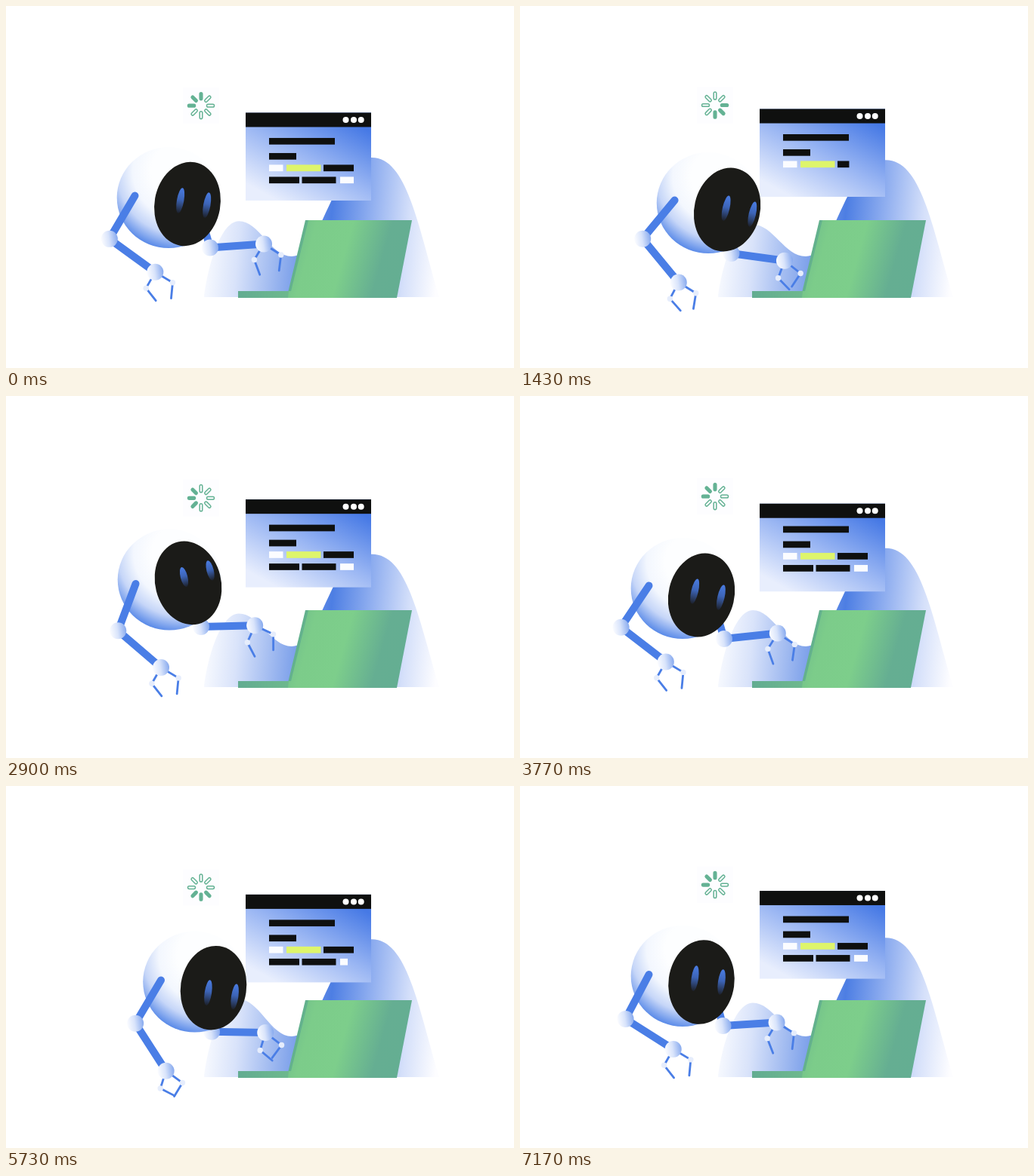
Recreate the animation shown at these times as an HTML page with a canvas. Size 672 by 480 pixels, loop 7.21 s.

```html
<!DOCTYPE html>
<html>
<head>
<meta charset="utf-8">
<style>
html, body { margin: 0; width: 672px; height: 480px; overflow: hidden; background: #fff; }
canvas { display: block; }
</style>
</head>
<body>
<canvas id="stage" width="672" height="480"></canvas>
<script>
const c = document.getElementById('stage').getContext('2d');
const LOOP = 7210, CYCLE = 3670, BOB = CYCLE / 2;
const BLUE = '#4a7ee6', GREEN = '#64b294', INK = '#0f100f';
const rad = d => d * Math.PI / 180;
const wave = (t, mid, amp, peak) => mid + amp * Math.cos((t - peak) / BOB * 2 * Math.PI);

// time, face x, y, tilt, gaze x, y, left upper arm, left forearm,
// right elbow x, right forearm, left grip, right grip
const POSES = [
  [0, 240, 262.5, 10, 8.2, -1.5, 120.4, 36, 30, -4, 0, 0],
  [100, 240, 264, 13, 8.5, -1, 123.7, 37.6, 30, -6, 0, 0],
  [360, 251, 267.5, 13, 9, 2, 129, 49, 20, 2, .5, .5],
  [670, 266, 270, 13, 10.5, 6, 134.1, 44.7, 9.5, 9, 1, 1],
  [1360, 274, 270, 13, 16, 2, 130.2, 49.9, 6, 8.2, .12, .85],
  [2100, 274.5, 267.5, 8, 10.5, 9, 119.9, 57.8, -2.5, .8, 1, 1],
  [2350, 263, 262, 0, 11, 2, 114, 63, 0, 0, .3, .3],
  [2760, 241.5, 247, -16, 12, -13, 110, 43.9, 13.5, -.8, 0, 0],
  [3500, 240, 260, 8, 9, -2.5, 117.7, 32.4, 28.5, -3.6, 0, 0]
];

// Smooth periodic interpolation without overshoot
function poseAt(t) {
  const n = POSES.length;
  const time = i => POSES[(i + n) % n][0] + Math.floor(i / n) * CYCLE;
  const val = (i, k) => POSES[(i + n) % n][k];
  const slope = (i, k) => (val(i + 1, k) - val(i, k)) / (time(i + 1) - time(i));
  const tangent = (i, k) => {
    const a = slope(i - 1, k), b = slope(i, k);
    return a * b > 0 ? 2 * a * b / (a + b) : 0;
  };
  let i = n - 1;
  while (time(i) > t) i--;
  const span = time(i + 1) - time(i), u = (t - time(i)) / span, v = 1 - u;
  return POSES[0].map((_, k) =>
    v * v * (1 + 2 * u) * val(i, k) + u * u * (3 - 2 * u) * val(i + 1, k) +
    span * u * v * (v * tangent(i, k) - u * tangent(i + 1, k)));
}

function stops(g, list) {
  list.forEach(([at, color]) => g.addColorStop(at, color));
  return g;
}
const linear = (x0, y0, x1, y1, ...list) => stops(c.createLinearGradient(x0, y0, x1, y1), list);

function rect(x, y, w, h, fill) {
  c.fillStyle = fill;
  c.fillRect(x, y, w, h);
}
function oval(x, y, rx, ry, tilt, fill) {
  c.beginPath();
  c.ellipse(x, y, rx, ry, tilt, 0, 2 * Math.PI);
  c.fillStyle = fill;
  c.fill();
}
function poly(points, fill) {
  c.beginPath();
  points.forEach(p => c.lineTo(...p));
  c.fillStyle = fill;
  c.fill();
}
function limb(points, width) {
  c.beginPath();
  points.forEach(p => c.lineTo(...p));
  c.lineWidth = width;
  c.lineCap = c.lineJoin = 'round';
  c.strokeStyle = BLUE;
  c.stroke();
}
const reach = ([x, y], length, deg) => [x + length * Math.cos(rad(deg)), y + length * Math.sin(rad(deg))];
const joint = ([x, y], r) =>
  oval(x, y, r, r, 0, linear(x - r, y, x + r, y - r * .3, [0, '#fbfcff'], [.45, '#d9e4fb'], [1, '#85a8ee']));

function hills(t) {
  const left = wave(t, 286, -4, 400), right = wave(t, 206, 5, 860);
  c.beginPath();
  c.moveTo(262, 386);
  c.bezierCurveTo(266, 350, 283, left, 308, left);
  c.bezierCurveTo(335, left, 350, 332, 378, 332);
  c.bezierCurveTo(400, 332, 411, 299, 430, 259);
  c.bezierCurveTo(445, 228, 460, right, 484, right);
  c.bezierCurveTo(530, right, 545, 290, 573, 386);
  c.fillStyle = linear(262, 300, 573, 330, [0, '#fcfdff'], [.15, '#d9e3fa'], [.38, '#83a5eb'],
    [.53, '#4d7ee3'], [.7, '#92b0f0'], [.86, '#d5e0fa'], [1, '#fdfdff']);
  c.fill();
}

const BLOCKS = [
  [348, 87, 0, INK], [348, 36, 20, INK], [348, 18.5, 35.5, '#fbfcff'], [371, 45.5, 35.5, '#def56b'],
  [420, 40, 35.5, INK], [348, 40, 51.5, INK], [391.5, 45, 51.5, INK], [442, 18, 51.5, '#fbfcff']
];
const windowTop = t => wave(t, 140.2, 4.2, 370);

function codeWindow(t, clip) {
  const y = windowTop(t), top = windowTop(clip) + 33.5;
  rect(317, y, 166, 116.5, linear(450, y + 8, 384, y + 130, [0, '#4679e5'], [.5, '#9ab6f3'], [1, '#e8eefd']));
  rect(317, y, 166, 19, INK);
  for (const x of [449.5, 460, 469.7]) oval(x, y + 9.5, 4, 4, 0, '#fff');
  BLOCKS.forEach(([x, w, dy, color], i) => {
    const start = i < 4 ? 690 + 165 * i : 1350 + 198 * (i - 4);
    const typed = clip < 400 ? 1 : Math.max(0, Math.min(1, (clip - start) / 210));
    rect(x, top + dy, w * typed, 8.7, color);
  });
}

function spinner(t, clip) {
  const y = wave(t, 134.5, -3.5, 1595);
  const head = Math.floor(clip / CYCLE * 8 - .02) + 8;
  rect(234, y - 24, 48, 48, '#fdfdff');
  for (let i = 0; i < 8; i++) {
    const lit = (i - head + 17) % 8 < 3;
    c.save();
    c.translate(258, y);
    c.rotate(i * Math.PI / 4);
    c.beginPath();
    c.roundRect(-1.8, -17.5, 3.6, 10, 1.8);
    c.lineWidth = 1.5;
    c.strokeStyle = c.fillStyle = GREEN;
    if (lit) c.fill();
    c.stroke();
    c.restore();
  }
}

function laptop() {
  const lid = linear(370, 310, 530, 355, [0, '#6cba8c'], [.2, '#7ccc8a'], [.48, '#7dce8b'], [.78, '#65ae92'], [1, '#64ae92']);
  rect(307, 378, 90, 9, linear(307, 0, 390, 0, [0, '#62ac91'], [1, '#70bb8c']));
  poly([[397, 284], [537, 284], [517, 387], [373, 387], [374, 378]], lid);
  poly([[396, 284], [400, 284], [377, 378], [373.5, 378]], '#63b18d');
}

function hand(wrist, grip, turn, curl) {
  const finger = (len, a, b) => {
    const knuckle = reach(wrist, len, a + turn);
    limb([wrist, knuckle, reach(knuckle, 21, b + turn)], 2.8);
    oval(...knuckle, 3.7, 3.7, 0, '#e6edfc');
  };
  finger(24.5, 119.5 - 12 * grip, curl - 25 * grip);
  finger(27, 31 + 5 * grip, 95.5 + 26 * grip);
  joint(wrist, 11);
}

function robot(t) {
  const [, x, y, tilt, gx, gy, upper, fore, rx, rFore, gripL, gripR] = poseAt(t);
  const hx = x - 24.8, hy = y - 6.7 - tilt * .17, turn = rad(tilt);

  const elbowR = [x + rx, y + 58], wristR = reach(elbowR, 71.2, rFore);
  limb([[hx + 40, hy + 15], elbowR, wristR], 10);
  joint(elbowR, 11);
  hand(wristR, gripR * 1.15, tilt * .3 - 1.5, 68);

  const shell = stops(c.createRadialGradient(hx + 15, hy - 35, 38, hx + 15, hy - 35, 108),
    [[0, '#fdfeff'], [.35, '#f3f7fe'], [.65, '#c6d6f8'], [1, '#4b80e6']]);
  oval(hx, hy, 68.5, 67, 0, shell);
  oval(x, y, 43.5, 56, turn, '#1b1b18');
  for (const side of [-17.8, 17.8]) {
    const size = tilt < 0 ? 17 + tilt * .25 : 17;
    c.save();
    c.translate(x + gx + side * Math.cos(turn), y + gy + side * Math.sin(turn));
    c.rotate(turn);
    oval(0, 0, 4.7, size, 0, linear(0, -size, 0, size, [0, '#4a7ce2'], [.45, '#3d65b8'], [1, '#1c2029']));
    c.restore();
  }

  const shoulder = [x - 69.5, y - 6 - tilt * .5];
  const elbow = reach(shoulder, 66.5, upper), wrist = reach(elbow, 74.8, fore);
  limb([shoulder, elbow, wrist], 10);
  joint(elbow, 11);
  hand(wrist, gripL, 0, 52);
}

function draw(now) {
  const time = now % LOOP, t = time % CYCLE;
  // The typed code and spinner pause briefly before their second run
  const clip = time > 3540 && time < 3800 ? 3500 : t;
  c.clearRect(0, 0, 672, 480);
  hills(t);
  codeWindow(t, clip);
  spinner(t, clip);
  laptop();
  robot(t);
}

const begin = performance.now();
function tick() {
  draw(performance.now() - begin);
  requestAnimationFrame(tick);
}
tick();
</script>
</body>
</html>
```
